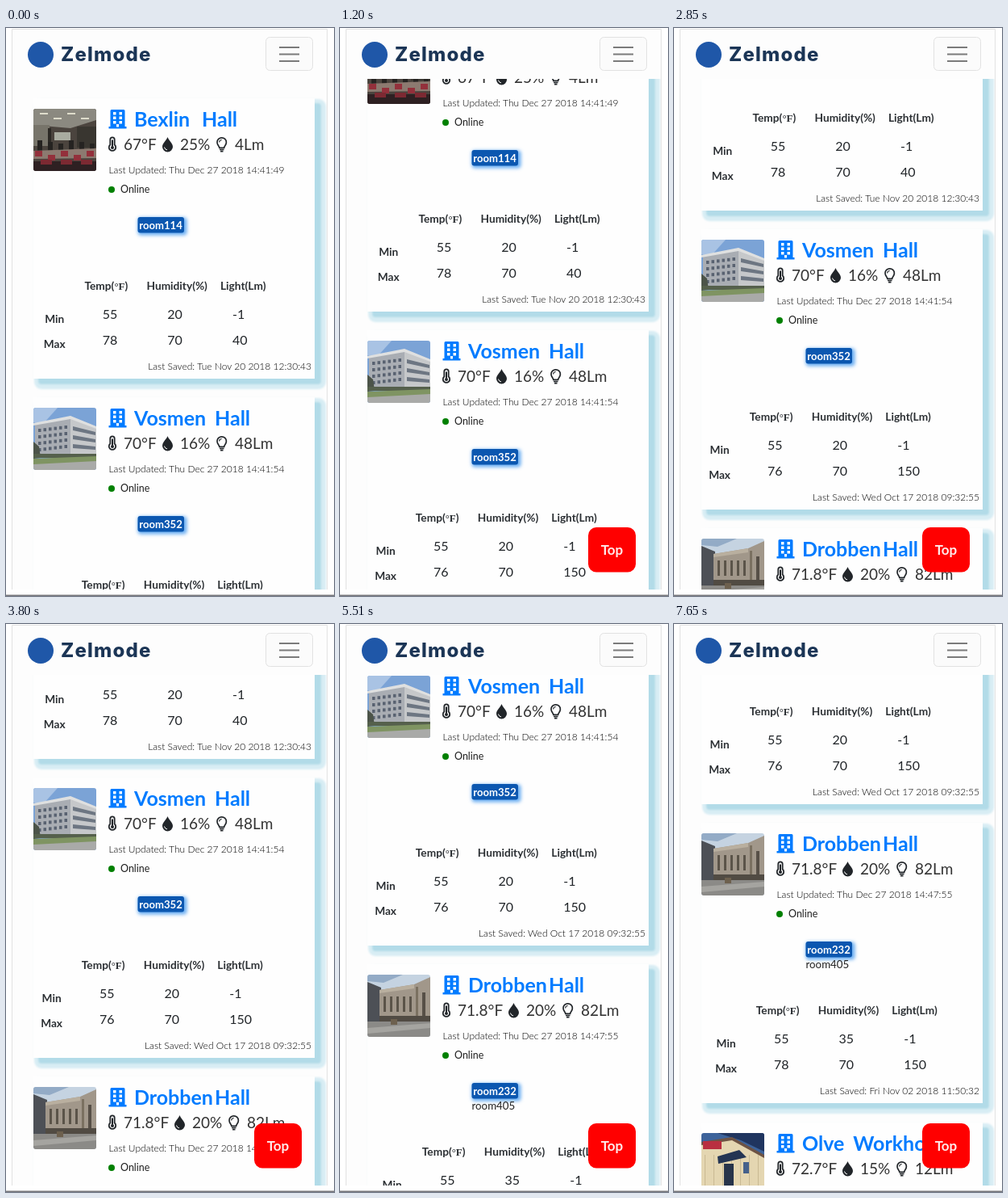
Write an HTML page that moves like this. It is 407x703 px and loops after 8 s.

```html
<!DOCTYPE html>
<html lang="en">
<head>
<meta charset="utf-8">
<title>Room sensors</title>
<style>
  html, body { margin: 0; width: 100%; height: 100%; overflow: hidden; background: #fff; }
  svg { display: block; width: 407px; height: 703px; font-family: Lato, "Open Sans", sans-serif; }
  text { white-space: pre; }
  .brand { font: 800 24px Inter, sans-serif; letter-spacing: 1.2px; fill: #1b3556; }
  .title { font-size: 25px; font-weight: 700; word-spacing: 5px; fill: #007bff; }
  .stat { font-size: 19px; fill: #333; }
  .note { font-size: 12px; font-weight: 300; fill: #000; }
  .online { font-size: 12.5px; fill: #222; }
  .room { font-size: 13.3px; fill: #222; }
  .pill { font-size: 13.1px; font-weight: 700; fill: #fff; }
  .head { font-size: 13.7px; font-weight: 700; fill: #2b2f33; }
  .serif { font: 700 13px "Liberation Serif", serif; }
  .value { font-size: 16px; fill: #212529; }
  .top { font-size: 17px; font-weight: 700; fill: #ffe9e9; }
  .end { text-anchor: end; }
  .mid { text-anchor: middle; }
</style>
</head>
<body>
<svg viewBox="0 0 407 703">
  <defs>
    <clipPath id="view"><rect x="9" y="63" width="389" height="632"/></clipPath>
    <clipPath id="photo"><rect width="78" height="77" rx="3"/></clipPath>
    <filter id="soft" x="-5%" y="-5%" width="110%" height="110%"><feGaussianBlur stdDeviation="1"/></filter>
    <filter id="glow" x="-20%" y="-50%" width="140%" height="200%"><feGaussianBlur stdDeviation="2.1"/></filter>

    <g id="building">
      <path fill="#007bff" d="M131 101h15q1.500 0 1.500 1.500V122h2v2.500h-22V122h2v-19.500q0-1.500 1.500-1.500z"/>
      <path fill="#fff" d="M133 104h3.500v3.500H133zM140.500 104h3.500v3.500h-3.500zM133 109.500h3.500v3.500H133zM140.500 109.500h3.500v3.500h-3.500zM133 115h3.500v3.500H133zM140.500 115h3.500v3.500h-3.500zM137 119h3v3.500h-3z"/>
    </g>
    <g id="thermo" fill="none" stroke="#212529">
      <path stroke-width="1.800" d="M129.300 144.500V138a2.700 2.700 0 0 1 5.400 0v6.500a4.200 4.200 0 1 1-5.400 0z"/>
      <path stroke-width="2" d="M132 138.500v8"/>
      <circle cx="132" cy="148" r="2" fill="#212529" stroke="none"/>
    </g>
    <g id="drop">
      <path fill="#212529" d="M200.500 135c1 3.500 6.500 7.500 6.500 12a6.500 6.500 0 0 1-13 0c0-4.500 5.500-8.500 6.500-12z"/>
      <path fill="none" stroke="#fff" d="M196.500 147.500q.5 3 3.500 3.400"/>
    </g>
    <g id="bulb" fill="none" stroke="#212529" stroke-width="1.700">
      <path d="M264.800 148.300c0-2.300-2.800-3.300-2.800-6.800a5.700 5.700 0 0 1 11.400 0c0 3.500-2.800 4.500-2.800 6.800z"/>
      <path d="M265 150.500h5.500M266 152.700h3.500"/>
      <path stroke-width="1.100" d="M264.700 141.500a3 3 0 0 1 3-3"/>
    </g>
    <g id="panel">
      <g filter="url(#soft)">
        <rect x="35" y="88" width="362" height="359" rx="9" fill="#d8edf4"/>
        <rect x="40" y="93" width="351" height="348" rx="4" fill="#b2dbe8"/>
      </g>
      <rect x="34" y="87" width="349" height="347" fill="#fefefe"/>
    </g>
  </defs>

  <rect x="8" y="1" width="391" height="694" fill="#fdfdfd"/>
  <g clip-path="url(#view)"><g id="list"></g></g>

  <g id="nav">
    <rect x="8" y="2" width="390" height="61" fill="#fdfdfd"/>
    <circle cx="43" cy="33" r="16" fill="#1f57a8"/>
    <text class="brand" x="68" y="41">Zelmode</text>
    <rect x="322.500" y="11.500" width="58" height="41" rx="5" fill="#fbfbfb" stroke="#e2e2e2"/>
    <path d="M339 24h25M339 32.500h25M339 41h25" stroke="#7b7b7b" stroke-width="1.800"/>
  </g>
  <path d="M7.500 695V1.500H398.500V695" fill="none" stroke="#e2e2e2"/>
  <rect y="701.500" width="407" height="1.500" fill="#77777b"/>

  <g id="topButton">
    <rect x="308" y="618" width="59" height="55.500" rx="10" fill="#f00"/>
    <text class="top mid" x="337.500" y="652">Top</text>
  </g>
</svg>
<script>
const LOOP = 8000, TICK = 41.5, PITCH = 370.4;

// Wheel ticks: start, settle time, distance covered at the start.
const ticks = [
  [500, 650, 1], [1050, 1200, 1], [1630, 1750, 28], [2150, 2270, 18],
  [2700, 2850, 18], [3280, 3400, 28], [3800, 3950, 18], [4380, 4500, 28],
  [4930, 5080, 18], [5510, 5630, 32], [5940, 6090, 1], [6550, 6550, 41],
  [6950, 7070, 28], [7500, 7650, 18]
];

const poly = (fill, points) => `<polygon fill="${fill}" points="${points}"/>`;
const box = (fill, x, y, w, h) => `<rect fill="${fill}" x="${x}" y="${y}" width="${w}" height="${h}"/>`;
const text = (cls, x, y, s) => `<text class="${cls}" x="${x}" y="${y}">${s}</text>`;
const icon = (id, dx = 0) => `<use href="#${id}" x="${dx}"/>`;
const row = (n, draw) => Array.from({ length: n }, (_, i) => draw(i)).join('');

const photos = {
  canteen: () => box('#4b443e', 0, 0, 78, 77) +
    poly('#8b8980', '0,0 78,0 78,14 46,24 0,20') +
    row(4, i => box('#dedccb', 8 + i * 17, 5 + i % 2 * 6, 10, 2)) +
    box('#77746a', 0, 20, 20, 26) + box('#a9aca0', 26, 29, 20, 10) +
    box('#2c2925', 18, 24, 4, 28) + box('#393630', 54, 22, 24, 26) +
    row(6, i => box('#252321', 5 + i * 13, 39 + i % 3 * 2, 6, 13)) +
    poly('#8c7a70', '0,52 78,49 78,61 0,62') +
    row(5, i => box('#93303b', 2 + i * 16, 52 + i % 2 * 5, 9, 7)) +
    box('#2e2022', 0, 65, 78, 12) + row(3, i => box('#7c2932', 9 + i * 25, 63, 14, 6)),
  offices: () => box('#7ba3d6', 0, 0, 78, 77) +
    poly('#a9c3e4', '0,0 30,0 12,20 0,18') +
    poly('#a9adb3', '2,20 46,12 46,59 2,60') +
    poly('#c6c8ca', '46,12 78,24 78,58 46,59') +
    poly('#dfe0e0', '0,19 46,10 78,23 78,26 46,14 0,22') +
    row(4, i => row(6, j => box('#596271', 6 + j * 6.5, 26 + i * 8 - j * .8, 3.5, 4))) +
    row(3, i => poly('#6d7682', `49,${23 + i * 11} 77,${30 + i * 9} 77,${34 + i * 9} 49,${28 + i * 11}`)) +
    poly('#4c5449', '0,42 7,48 9,62 0,63') + box('#55604c', 0, 57, 78, 5) +
    poly('#7f9462', '0,63 78,60 78,67 0,71') + poly('#a9aaa8', '0,70 78,66 78,77 0,77'),
  stone: () => box('#c5d3e1', 0, 0, 78, 77) +
    poly('#93abc6', '0,0 44,0 20,10 0,8') +
    poly('#4d5056', '0,9 17,16 17,58 0,59') +
    poly('#a1978a', '15,19 58,12 78,3 78,60 15,58') +
    poly('#b9af9f', '15,19 58,12 58,17 15,23') +
    row(5, i => box('#5b5449', 20 + i * 8, 27, 3, 19)) +
    box('#7b7161', 60, 15, 3, 44) + box('#575047', 68, 22, 4, 30) +
    box('#514b43', 15, 51, 63, 7) + box('#8b8a87', 0, 58, 78, 19) +
    poly('#a5a4a0', '0,66 78,60 78,66 0,73') + box('#6d604e', 29, 55, 8, 7),
  shed: () => box('#3d639a', 0, 0, 78, 77) +
    poly('#20355f', '20,0 78,0 78,23 49,9') +
    poly('#e4d6b1', '0,13 38,7 78,29 78,77 0,77') +
    poly('#6d5344', '0,11 38,5 78,27 78,31 38,9 0,15') +
    row(7, i => box('#c9b993', 4 + i * 11, 27, 1, 42)) +
    box('#b92f40', 2, 10, 23, 10) + poly('#243553', '20,29 47,21 56,30 21,38') +
    box('#27344a', 28, 38, 12, 32) + box('#45618b', 52, 36, 7, 14) + box('#65513f', 0, 68, 78, 9)
};

const cards = [
  { name: 'Bexlin', tail: 243, photo: 'canteen', stats: ['67°F', '25%', '4Lm'], updated: '14:41:49',
    rooms: ['room114'], shift: 0, min: [55, 20, -1], max: [78, 70, 40], saved: 'Tue Nov 20 2018 12:30:43' },
  { name: 'Vosmen', tail: 259, photo: 'offices', stats: ['70°F', '16%', '48Lm'], updated: '14:41:54',
    rooms: ['room352'], shift: -3.7, min: [55, 20, -1], max: [76, 70, 150], saved: 'Wed Oct 17 2018 09:32:55' },
  { name: 'Drobben', tail: 259, photo: 'stone', stats: ['71.8°F', '20%', '82Lm'], wide: 15, updated: '14:47:55',
    rooms: ['room232', 'room405'], shift: 4.3, min: [55, 35, -1], max: [78, 70, 150], saved: 'Fri Nov 02 2018 11:50:32' },
  { name: 'Olve Workhouse', photo: 'shed', stats: ['72.7°F', '15%', '12Lm'], wide: 15, updated: '14:47:55',
    rooms: ['room101'], shift: 0, min: [55, 20, -1], max: [78, 70, 150], saved: 'Fri Nov 02 2018 11:50:32' }
];

function table({ shift, min, max }) {
  const values = (list, y) => list.map((v, i) => text('value', [119.7, 200.2, 281][i], y, v)).join('');
  return `<g transform="translate(${shift})">` +
    text('head', 97.5, 324, 'Temp(<tspan class="serif">°F</tspan>)') +
    text('head', 174.5, 324, 'Humidity(%)') + text('head', 266, 324, 'Light(Lm)') +
    text('head mid', 60.3, 365, 'Min') + text('head mid', 60.3, 396, 'Max') +
    values(min, 360) + values(max, 392) + '</g>';
}

function card(c, i) {
  const wide = c.wide || 0;
  return `<g transform="translate(0 ${Math.floor(i * PITCH)})">` + icon('panel') +
    `<g transform="translate(34 100)" clip-path="url(#photo)">${photos[c.photo]()}</g>` +
    icon('building') + text('title', 159, 122, c.name) + (c.tail ? text('title', c.tail, 122, 'Hall') : '') +
    icon('thermo') + text('stat', 146, 151, c.stats[0]) +
    icon('drop', wide) + text('stat', 216 + wide, 151, c.stats[1]) +
    icon('bulb', wide) + text('stat', 284 + wide, 151, c.stats[2]) +
    text('note', 127.5, 180, 'Last Updated: Thu Dec 27 2018 ' + c.updated) +
    '<circle cx="131" cy="200" r="4" fill="#008000"/>' + text('online', 142, 204, 'Online') +
    `<rect x="163.500" y="234.500" width="61" height="22" rx="4" fill="#6aaef2" filter="url(#glow)"/>
    <rect x="163.500" y="234" width="57.500" height="19.500" rx="3" fill="#0b57b0"/>` +
    text('pill mid', 192, 248.5, c.rooms[0]) +
    (c.rooms[1] ? text('room', 163.5, 266.5, c.rooms[1]) : '') +
    table(c) + text('note end', 379, 423, 'Last Saved: ' + c.saved) + '</g>';
}

const list = document.getElementById('list');
const topButton = document.getElementById('topButton');
list.innerHTML = cards.map(card).join('');

function scrollAt(t) {
  const done = ticks.filter(([, settle]) => t >= settle).length;
  const next = ticks[done];
  const partial = next && t >= next[0] ? next[2] : 0;
  return Math.round(done * TICK) + partial;
}

function render(t) {
  const y = scrollAt(t);
  list.setAttribute('transform', `translate(0 ${-y})`);
  topButton.setAttribute('visibility', y > 8 ? 'visible' : 'hidden');
}

function loop() {
  render(performance.now() % LOOP);
  requestAnimationFrame(loop);
}
loop();
</script>
</body>
</html>
```
